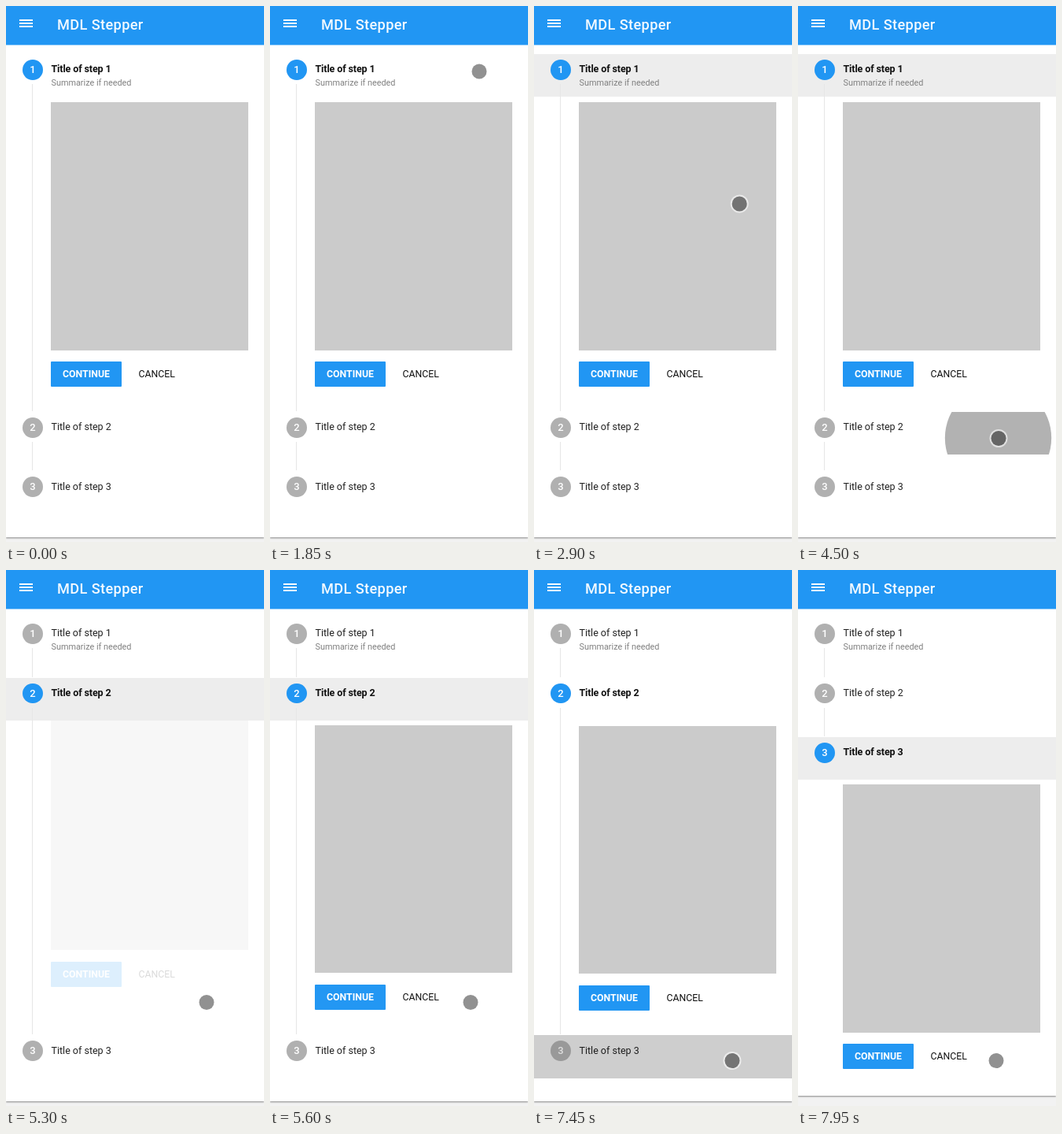
An HTML page that plays this animation: 328x680 px, repeating every 8 s.

```html
<!DOCTYPE html>
<html lang="en">
<head>
<meta charset="utf-8">
<title>Stepper</title>
<style>
  html, body { margin: 0; width: 100%; height: 100%; overflow: hidden; }
  body { position: relative; background: #f2f2f2; font: 12.5px/16px Roboto, sans-serif; color: #212121; }
  body * { position: absolute; box-sizing: border-box; white-space: nowrap; }
  script { display: none; }
  #card { left: 0; top: 0; width: 328px; height: 674px; background: #fff; box-shadow: 0 1px 2px rgba(0,0,0,.45); }
  #bar { left: 0; top: 0; width: 328px; height: 49px; background: #2196f3; box-shadow: 0 1px rgba(33,150,243,.5); }
  #menu { left: 17px; top: 17px; width: 17px; height: 10px;
          background: repeating-linear-gradient(#fff 0 2px, transparent 2px 4px); }
  #name { left: 65px; top: 12px; font-size: 18.2px; font-weight: 500; line-height: 24px; letter-spacing: .02em; color: #f4faff; }
  .header { left: 0; width: 328px; height: 54.4px; overflow: hidden; }
  .header.focus { background: #ededed; }
  .dot { left: 21.1px; top: 7.1px; width: 25.8px; height: 25.8px; border-radius: 50%; background: #b0b0b0;
         color: #fff; font-size: 13px; font-weight: 500; line-height: 26px; text-align: center; }
  .title { left: 57.5px; top: 11.3px; }
  .note { left: 57.5px; top: 28.6px; font-size: 10.85px; color: #808080; }
  .active .dot { background: #2196f3; }
  .active .title { font-weight: 700; letter-spacing: -.12px; color: #111; }
  .ripple { inset: 0; background: #000; }
  .line { left: 33px; width: 1px; background: #e6e6e6; }
  #content { left: 0; width: 328px; height: 370px; }
  #panel { left: 57px; top: 0; width: 251px; height: 314.5px; background: #cbcbcb; }
  .button { top: 329px; height: 32px; line-height: 32px; font-size: 12.3px; color: #111; }
  #go { left: 57px; width: 90px; border-radius: 1px; text-align: center; background: #2196f3; color: #fff; font-weight: 700; }
  #cancel { left: 168.5px; }
  #cursor { left: -9.5px; top: -9.5px; width: 19px; height: 19px; border-radius: 50%;
            background: rgba(0,0,0,.43); box-shadow: 0 0 0 2px rgba(255,255,255,.6); }
</style>
</head>
<body>
<div id="card"></div>
<div id="bar">
  <div id="menu"></div>
  <div id="name">MDL Stepper</div>
</div>
<div id="content">
  <div id="panel"></div>
  <div id="go" class="button">CONTINUE</div>
  <div id="cancel" class="button">CANCEL</div>
</div>
<script>
const LOOP = 8000, TICK = 50;
const RIPPLE_SPEED = 2.82, RIPPLE_FADE = 350, REVEAL = 450;

// Each press grows a ripple until it stalls, fills the header, then fades on release.
const clicks = [
  { x: 265.5, y: 82.5, press: 2125, stall: 2250, fill: 2250, release: 2400, opens: 0 },
  { x: 254.5, y: 548, press: 4476, stall: 4550, fill: 4750, release: 4700, opens: 5300 },
  { x: 251.5, y: 622, press: 6595, stall: 6650, fill: 6950, release: 7250, opens: 7650 }
];
const entry = { x: 183, y: 100.5 };
const moves = [
  { start: 1500, duration: 350, to: clicks[0] },
  { start: 2803, duration: 200, to: { x: 266.5, y: 462 } },
  { start: 3200, duration: 350, to: clicks[1] },
  { start: 5900, duration: 350, to: clicks[2] }
];

const $ = id => document.getElementById(id);
const progress = (t, start, duration) => Math.min(1, Math.max(0, (t - start) / duration));
const easeInOut = k => k < .5 ? 8 * k ** 4 : 1 - 8 * (1 - k) ** 4;
const stepTop = (i, active) => 61 + 75.5 * i + (i > active ? 378.3 : 0);
const lastIndex = test => clicks.filter(test).length - 1;

function add(className, parent, text = '') {
  const el = document.createElement('div');
  el.className = className;
  el.textContent = text;
  parent.append(el);
  return el;
}

const steps = clicks.map((click, i) => {
  const header = add('header', document.body);
  add('dot', header, i + 1);
  add('title', header, `Title of step ${i + 1}`);
  if (i === 0) add('note', header, 'Summarize if needed');
  const line = i < clicks.length - 1 ? add('line', document.body) : null;
  return { click, header, line, ripple: add('ripple', header) };
});
const cursor = add('', document.body);
cursor.id = 'cursor';

// Travel bows slightly to the left, in proportion to its length.
function pointerAt(t) {
  let { x, y } = entry;
  for (const { start, duration, to } of moves) {
    const k = easeInOut(progress(t, start, duration));
    const bow = .014 * Math.hypot(to.x - x, to.y - y) * Math.sin(Math.PI * k);
    x += (to.x - x) * k - bow;
    y += (to.y - y) * k;
  }
  return { x, y };
}

function drawRipple(ripple, { x, y, press, stall, fill, release }, top, t) {
  const radius = t >= fill ? 330 : RIPPLE_SPEED * Math.max(0, Math.min(t, stall) - press);
  ripple.style.clipPath = `circle(${radius}px at ${x}px ${y - top}px)`;
  ripple.style.opacity = .3 * (1 - progress(t, release, RIPPLE_FADE));
}

function render(t) {
  const active = lastIndex(click => t >= click.opens);
  const focus = lastIndex(click => t > click.release);

  steps.forEach(({ click, header, line, ripple }, i) => {
    const top = stepTop(i, active);
    header.style.top = top + 'px';
    header.classList.toggle('active', i === active);
    header.classList.toggle('focus', i === focus);
    if (line) {
      line.style.top = top + 38 + 'px';
      line.style.height = stepTop(i + 1, active) - top - 39 + 'px';
    }
    drawRipple(ripple, click, stepTop(i, Math.max(0, i - 1)), t);
  });

  const left = active ? 1 - progress(t, clicks[active].opens, REVEAL) : 0;
  $('content').style.top = stepTop(active, active) + 61.3 - 30 * left ** 3 + 'px';
  $('content').style.opacity = 1 - .85 * left ** 4;
  $('card').style.height = (active === 2 ? 667 : 674) + 'px';

  const { x, y } = pointerAt(t);
  cursor.style.transform = `translate(${x}px, ${y}px)`;
  cursor.style.opacity = progress(t, 700, 150);
}

const start = performance.now();
function frame() {
  const t = (performance.now() - start) % LOOP;
  render(Math.floor(t / TICK) * TICK);
  requestAnimationFrame(frame);
}
frame();
</script>
</body>
</html>
```
